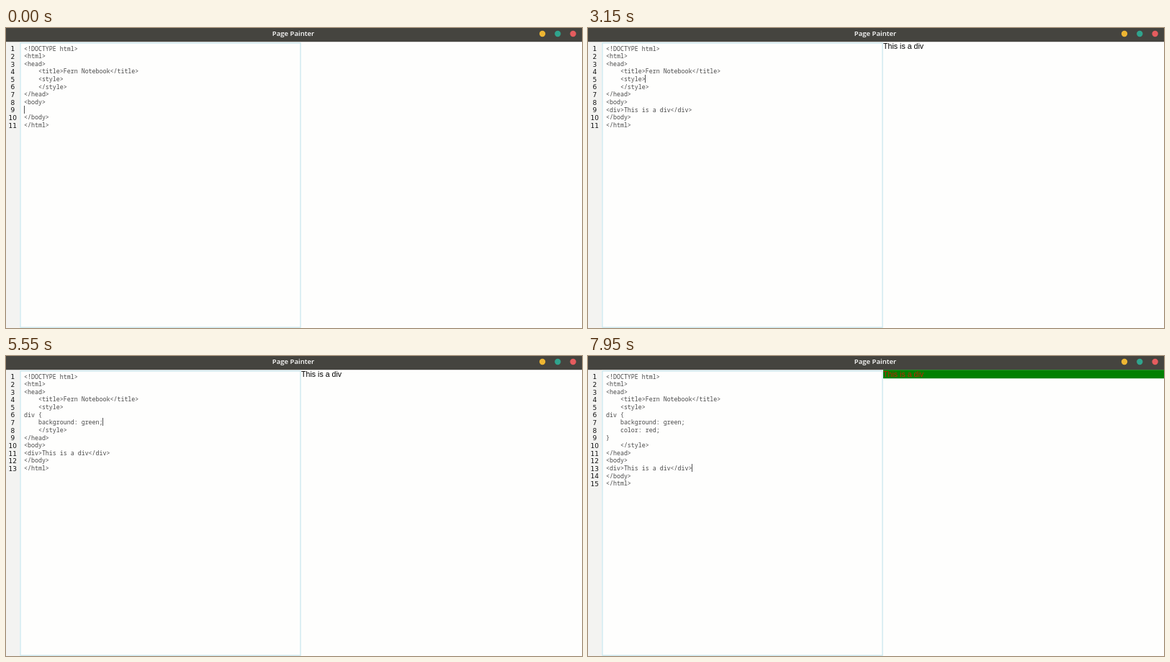
Animation of 800 by 417 pixels, one loop 8 s. Source, as an HTML page with a canvas:

```html
<!DOCTYPE html>
<html lang="en">
<head>
<meta charset="utf-8">
<title>Editor with preview</title>
<style>
html, body { margin: 0; width: 100%; height: 100%; overflow: hidden; background: #fefefd; }
canvas { display: block; }
</style>
</head>
<body>
<canvas id="stage" width="800" height="417"></canvas>
<script>
const ctx = document.getElementById('stage').getContext('2d');
const LOOP = 8000;
const LINE = 10.62, COLUMN = 4.98, LEFT = 25, HEADER = 19.2;
const START = ['<!DOCTYPE html>', '<html>', '<head>', '    <title>Fern Notebook</title>',
  '    <style>', '    </style>', '</head>', '<body>', '', '</body>', '</html>'];

// Bursts of keys: [start, gap, keys]; ← backspace, ↑ ↓ arrows, → end of line.
const BURSTS = [
  [50, 0, '<'], [200, 50, 'div'], [550, 0, '.'], [750, 0, '←'], [850, 0, '>'],
  [1000, 50, 'This is'], [1350, 0, ' a'], [1550, 50, ' d'], [1700, 50, 'iv'], [2000, 0, '<'],
  [2200, 50, '/div>'], [2900, 0, '↑'], [3000, 75, '↑↑↑'],
  [3350, 0, '\n'], [3600, 50, 'div'], [3800, 150, ' {'], [4050, 0, '\n'],
  [4200, 0, '\t'], [4300, 50, 'back'], [4550, 50, 'groun'],
  [5050, 0, 'd'], [5150, 50, ': green'], [5550, 0, ';'], [5700, 0, '\n'],
  [5800, 50, '\tcolor'], [6200, 50, ': red'], [6500, 0, ';'], [6750, 0, '\n'],
  [7000, 0, '}'], [7350, 100, '↓↓↓'], [7700, 0, '↓'], [7950, 0, '→']
];
const KEYS = BURSTS.flatMap(([start, gap, keys]) =>
  [...keys].map((key, i) => ({ time: start + i * gap, key })));
const STYLED_AT = 7150;

function editorAt(time) {
  const lines = [...START];
  let row = 8, col = 0, goal = 0;
  for (const { time: at, key } of KEYS) {
    if (at > time) break;
    const line = lines[row];
    if (key === '↑' || key === '↓') {
      row += key === '↑' ? -1 : 1;
      col = Math.min(goal, lines[row].length);
      continue;
    }
    const before = line.slice(0, col), after = line.slice(col);
    if (key === '→') {
      col = line.length;
    } else if (key === '←') {
      lines[row] = before.slice(0, -1) + after;
      col--;
    } else if (key === '\n') {
      lines.splice(row, 1, before, after);
      row++;
      col = 0;
    } else {
      const typed = key === '\t' ? '    ' : key;
      lines[row] = before + typed + after;
      col += typed.length;
    }
    goal = col;
  }
  return { lines, row, col };
}

function rect(color, x, y, w, h) {
  ctx.fillStyle = color;
  ctx.fillRect(x, y, w, h);
}

function text(string, x, y, font, color, align = 'left') {
  ctx.font = font;
  ctx.fillStyle = color;
  ctx.textAlign = align;
  ctx.fillText(string, x, y);
}

// Pick the font size whose character advance equals one column.
const MONO = '"Noto Sans Mono", "DejaVu Sans Mono", monospace';
ctx.font = `100px ${MONO}`;
const CODE_FONT = `${100 * COLUMN / ctx.measureText('m').width}px ${MONO}`;

function drawWindow() {
  rect('#fefefd', 0, 0, 800, 417);
  rect('#f3f3f1', 0, 19, 19, 398);
  ctx.strokeStyle = '#cde8ee';
  ctx.lineWidth = 1.4;
  ctx.strokeRect(20, 20.8, 389, 395.4);
  rect('#45443f', 0, 0, 800, HEADER);
  text('Page Painter', 399, 11, '600 9.6px "Open Sans", "Noto Sans", sans-serif', '#fff', 'center');
  ['#edb532', '#30a48d', '#e55c5e'].forEach((color, i) => {
    ctx.fillStyle = color;
    ctx.beginPath();
    ctx.arc(745 + i * 21.3, 8, 4.2, 0, Math.PI * 2);
    ctx.fill();
  });
}

function drawEditor({ lines, row, col }) {
  lines.forEach((line, i) => {
    const y = 31.6 + i * LINE;
    text(i + 1, 9.3, y + 0.7, '9px "DejaVu Sans", sans-serif', '#111', 'center');
    text(line, LEFT, y, CODE_FONT, '#484848');
  });
  rect('#555', Math.floor(LEFT + col * COLUMN), Math.round(22.7 + row * LINE), 1, 11);
}

function drawPreview(lines, styled) {
  const source = lines[lines.indexOf('<body>') + 1];
  const content = source.replace(/<[\/a-z][^>]*>?/g, '');
  if (styled) rect('#008000', 410, HEADER, 390, 12);
  text(content, 410, 28.8, '10.63px "Liberation Sans", sans-serif', styled ? '#c42000' : '#000');
}

function frame() {
  const time = performance.now() % LOOP;
  const editor = editorAt(time);
  drawWindow();
  drawEditor(editor);
  drawPreview(editor.lines, time >= STYLED_AT);
  requestAnimationFrame(frame);
}
frame();
</script>
</body>
</html>
```
